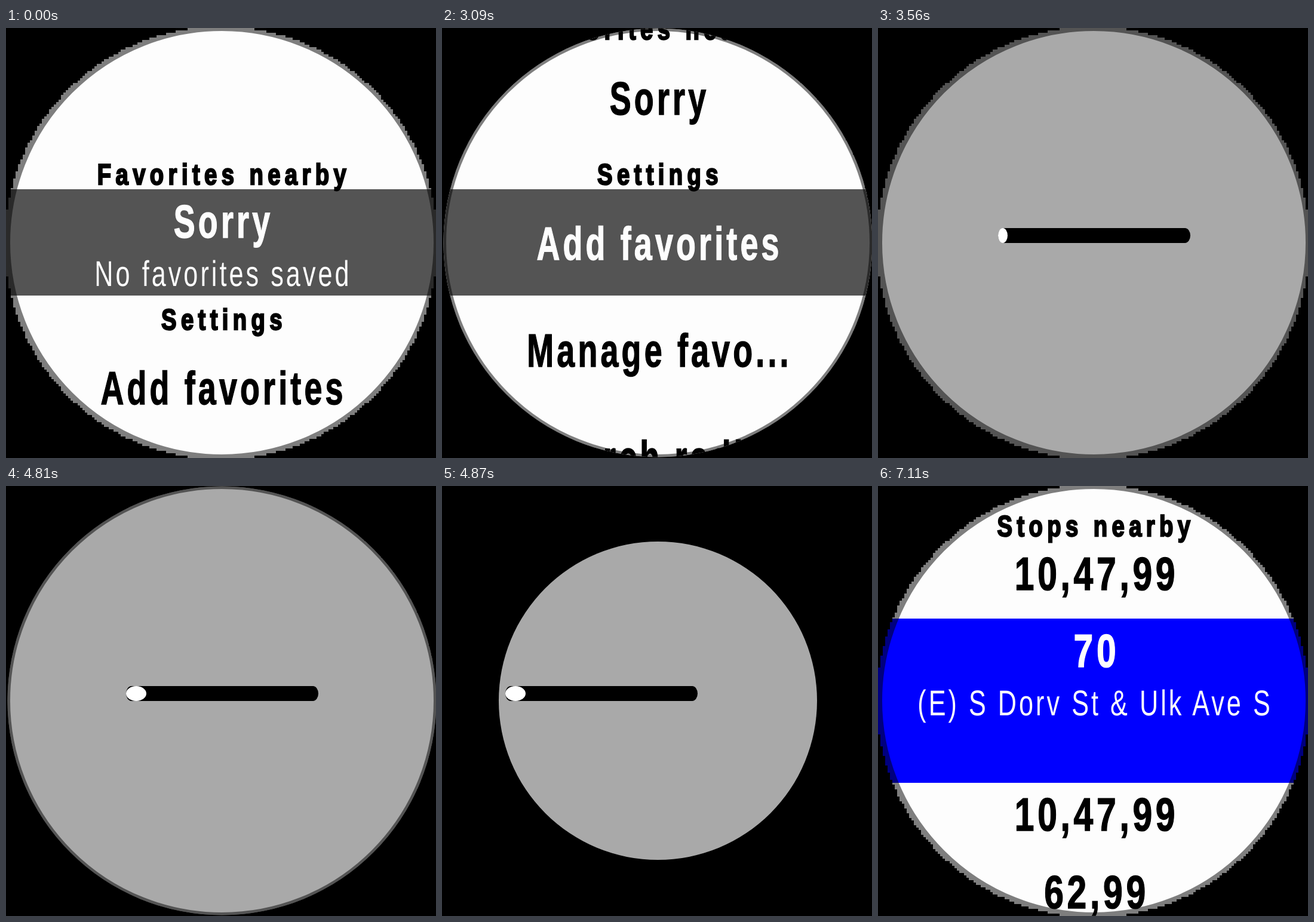
An HTML page that plays this animation: 720 px wide and 720 px high, repeating every 8 s.

```html
<!DOCTYPE html>
<html lang="en">
<head>
<meta charset="utf-8">
<title>Round watch menu</title>
<style>
  html, body { margin: 0; width: 100%; height: 100%; overflow: hidden; background: #000; }
  svg { display: block; width: 100%; height: 100%; }
  text { font-family: "Liberation Sans", Arial, sans-serif; text-anchor: middle; text-rendering: geometricPrecision; stroke: currentColor; stroke-width: 0; }
  .title, .num { font-size: 78px; font-weight: 700; letter-spacing: 7.5px; stroke-width: 1.5px; }
  .sub { font-size: 60px; letter-spacing: 5.6px; }
  .head { font-size: 49px; font-weight: 700; letter-spacing: 9.5px; stroke-width: 2.5px; }
</style>
</head>
<body>
<svg viewBox="0 0 720 720">
  <defs>
    <clipPath id="screen"><path id="glass"/></clipPath>
    <clipPath id="port"><circle id="hole" cx="361.5" cy="359.5" r="400"/></clipPath>
  </defs>
  <rect width="720" height="720"/>
  <g clip-path="url(#screen)">
    <g clip-path="url(#port)">
      <g id="stage"></g>
      <circle cx="361.5" cy="359.5" r="374.5" fill="none" stroke="#000" stroke-opacity=".5" stroke-width="40"/>
    </g>
  </g>
</svg>
<script>
const LOOP = 8000, FULL = 400, THIN = 359, SMALL = 266.5;
const PAPER = '#fdfdfd';
const CONDENSE = { title: 0.69, num: 0.755, sub: 0.72, head: 0.78 };
const CENTER = { title: 364, num: 366, sub: 363.5, head: 365 };
const $ = id => document.getElementById(id);
const stage = $('stage');

// The round display has square pixels, so its rim is a staircase.
function steppedDisc(radius, pixel) {
  let path = '';
  for (let y = 0; y < 720; y += pixel) {
    const dy = y + pixel / 2 - 360;
    const half = Math.round(Math.sqrt(radius * radius - dy * dy) / pixel) * pixel;
    path += `M${360 - half} ${y}h${2 * half}v${pixel}h${-2 * half}z`;
  }
  return path;
}
$('glass').setAttribute('d', steppedDisc(362.4, 4));

function add(parent, tag, attrs) {
  const el = document.createElementNS('http://www.w3.org/2000/svg', tag);
  for (const key in attrs) el.setAttribute(key, attrs[key]);
  return parent.appendChild(el);
}

function scene(fill) {
  const g = add(stage, 'g', { display: 'none' });
  add(g, 'rect', { x: -400, width: 1520, height: 720, fill });
  return g;
}

function label(g, style, baseline, words, color) {
  const el = add(g, 'text', {
    class: style, fill: color, color,
    transform: `translate(${CENTER[style]} ${baseline}) scale(${CONDENSE[style]} 1)`
  });
  el.textContent = words;
}

// rows: [style, baseline, words, light?]
function menu(top, bottom, color, rows) {
  const g = scene(PAPER);
  add(g, 'rect', { x: 0, y: top, width: 720, height: bottom - top, fill: color });
  for (const [style, y, words, light] of rows) label(g, style, y, words, light ? PAPER : '#000');
  return g;
}

const scenes = {
  favorites: menu(270, 448, '#545454', [
    ['head', 262, 'Favorites nearby'],
    ['title', 351, 'Sorry', true],
    ['sub', 432, 'No favorites saved', true],
    ['head', 505, 'Settings'],
    ['title', 630, 'Add favorites']
  ]),
  settings: menu(270, 448, '#545454', [
    ['head', 19, 'Favorites nearby'],
    ['title', 145, 'Sorry'],
    ['head', 262, 'Settings'],
    ['title', 388, 'Add favorites', true],
    ['title', 567, 'Manage favo...'],
    ['title', 746, 'Search radi...']
  ]),
  loading: scene('#a9a9a9'),
  stopA: menu(222, 497, '#00f', [
    ['head', 213, 'Stops nearby'],
    ['num', 303, '10,47,99', true],
    ['sub', 384, '(S) Orl Ave S & Pelnor Way', true],
    ['num', 577, '70'],
    ['num', 707, '10,47,99']
  ]),
  stopB: menu(222, 497, '#00f', [
    ['head', 84, 'Stops nearby'],
    ['num', 174, '10,47,99'],
    ['num', 303, '70', true],
    ['sub', 384, '(E) S Dorv St & Ulk Ave S', true],
    ['num', 577, '10,47,99'],
    ['num', 707, '62,99']
  ])
};

const BAR = { x: 201, y: 335, height: 25, ry: 12.5 };
add(scenes.loading, 'rect', { ...BAR, width: 322, rx: 9 });
const fillBar = add(scenes.loading, 'rect', { ...BAR, width: 0, fill: '#fff' });

// [start ms, scene, hole radius, sideways shift, bar fill]
const steps = [
  [0, 'favorites', FULL, 0, 0],
  [500, 'settings', FULL, 0, 0],
  [3090, 'settings', THIN, 0, 0],
  [3210, 'loading', SMALL, 95, 0],
  [3270, 'loading', FULL, 0, 0],
  [3420, 'loading', FULL, 0, 6],
  [3490, 'loading', FULL, 0, 11],
  [3560, 'loading', FULL, 0, 16],
  [3740, 'loading', FULL, 0, 20],
  [3840, 'loading', FULL, 0, 24],
  [3950, 'loading', FULL, 0, 28],
  [4290, 'loading', FULL, 0, 32],
  [4470, 'loading', THIN, 0, 32],
  [4540, 'loading', FULL, 0, 32],
  [4610, 'loading', THIN, 0, 32],
  [4670, 'loading', FULL, 0, 34],
  [4810, 'loading', THIN, 0, 34],
  [4870, 'loading', SMALL, -95, 34],
  [4990, 'stopA', FULL, 0, 0],
  [7110, 'stopB', FULL, 0, 0]
];

let shown;
function show(step) {
  if (step === shown) return;
  shown = step;
  const [, name, radius, shift, filled] = step;
  for (const key in scenes) scenes[key].setAttribute('display', key === name ? 'inline' : 'none');
  $('hole').setAttribute('r', radius);
  stage.setAttribute('transform', `translate(${shift} 0)`);
  fillBar.setAttribute('width', filled);
  fillBar.setAttribute('rx', filled / 2);
}

const start = performance.now();
function tick() {
  const t = (performance.now() - start) % LOOP;
  show(steps.findLast(step => step[0] <= t) || steps[0]);
  requestAnimationFrame(tick);
}
tick();
</script>
</body>
</html>
```
